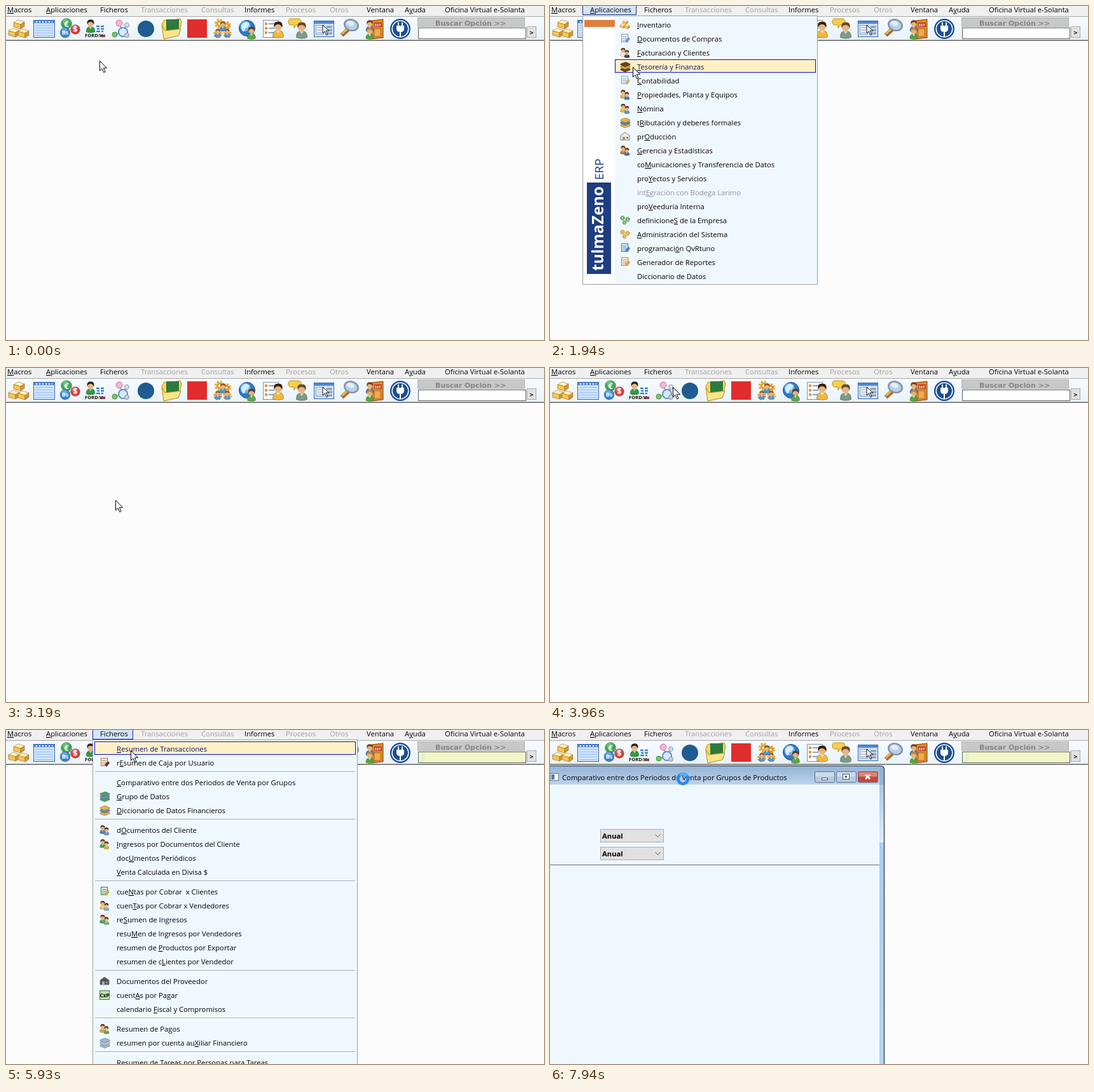
These frames come from a looping animation (846x526 px, 8 s). An HTML page:

```html
<!DOCTYPE html>
<html lang="es">
<head>
<meta charset="utf-8">
<style>
html, body { margin: 0; width: 100%; height: 100%; overflow: hidden; background: #fcfcfc; }
svg { display: block; width: 846px; height: 526px; }
text { font-family: "Open Sans", "Noto Sans", sans-serif; font-size: 11.25px; white-space: pre; }
.wide { font-family: "DejaVu Sans", Verdana, sans-serif; font-weight: bold; }
.u { text-decoration: underline; }
</style>
</head>
<body>
<svg id="stage" viewBox="0 0 846 526"></svg>
<script>
const LOOP = 8000;
const PANEL = '#f0f8ff', NAVY = '#1f3d80';

// Shape helpers
const rect = (x, y, w, h, fill, extra = '') => `<rect x="${x}" y="${y}" width="${w}" height="${h}" fill="${fill}" ${extra}/>`;
const frame = (x, y, w, h, fill, stroke) => rect(x + .5, y + .5, w - 1, h - 1, fill, `stroke="${stroke}"`);
const disc = (x, y, r, fill, extra = '') => `<circle cx="${x}" cy="${y}" r="${r}" fill="${fill}" ${extra}/>`;
const path = (d, fill, stroke = 'none', width = 1) => `<path d="${d}" fill="${fill}" stroke="${stroke}" stroke-width="${width}"/>`;
const line = (d, stroke, width = 1) => path(d, 'none', stroke, width);
const at = (x, y, scale, body) => `<g transform="translate(${x} ${y}) scale(${scale})">${body}</g>`;
// An underscore marks the underlined access key.
const text = (x, y, label, extra = '') =>
  `<text x="${x}" y="${y}" ${extra}>${label.replace(/_(.)/, '<tspan class="u">$1</tspan>')}</text>`;

// Icon parts, drawn around their own origin
const bar = (x, y) => at(x, y, 1,
  path('M0 4 7 0 17 3 11 7Z', '#fff3c4', '#b98a2c', .7) +
  path('M0 4 11 7V14L0 11Z', '#f5c55c', '#a87518', .7) +
  path('M11 7 17 3V10L11 14Z', '#d6982f', '#a87518', .7));
const person = (x, y, coat, hair = '#7a4a1c', scale = 1) => at(x, y, scale,
  path('M-8 14Q-9 4 0 4Q9 4 8 14Q0 17 -8 14Z', coat, '#00000066', .7) + path('M-3 4H3L0 9Z', '#fff9') +
  disc(0, -2, 6, '#e9b37c') + path('M-6 0Q-8 -9 0 -9Q8 -9 6 0Q4 -5 -1 -5Q-5 -4 -6 0Z', hair));
const gear = (x, y, r, fill) =>
  disc(x, y, r, 'none', `stroke="${fill}" stroke-width="${r * .7}" stroke-dasharray="${r * .45} ${r * .335}"`) +
  disc(x, y, r * .62, 'none', `stroke="${fill}" stroke-width="${r * .6}"`);
const globe = (x, y, r) => disc(x, y, r, '#3477c9', 'stroke="#1c4f94"') + disc(x - r * .2, y - r * .25, r * .65, '#6fb2ee') +
  path(`M${x - r * .7} ${y - r * .4}q${r * .5} ${-r * .7} ${r} ${-r * .2}q${-r * .1} ${r * .6} ${-r * .5} ${r * .6}q${-r * .2} ${r * .8} ${-r * .5} ${r * .1}Z`, '#d3eefa');
const panelWindow = (x, y, w, h) => frame(x, y, w, h, '#cfe3fb', '#3868b0') + rect(x + 1, y + 1, w - 2, 4, '#4f88dc');
const coin = (x, y, r, fill, sign, size) => disc(x, y, r, fill, 'stroke="#0003"') + disc(x - 1, y - r * .4, r * .55, '#fff4') +
  text(x, y + size * .36, sign, `fill="#fff" text-anchor="middle" style="font-size:${size}px;font-weight:bold"`);

const toolbarIcons = () => [
  bar(12, 22) + bar(4, 35) + bar(19, 36),
  panelWindow(43, 22, 34, 28) + `<path d="M47 25H73" stroke="#fff" stroke-width="2" stroke-dasharray="2 3"/>` +
    line('M46 30.5H74M46 34.5H74M46 38.5H74M46 42.5H74M46 46.5H74', '#9cc0f0'),
  coin(95, 28, 8.5, '#3fa653', '€', 13) + coin(93, 42, 8, '#3985d8', 'Bs', 9) + coin(109, 37, 7.5, '#d9423a', '$', 12),
  person(133, 29, '#2f9c3c', '#222', .85) + line('M142 32h5m2 0h5M143 36h4m2 0h5M142 40h6m2 0h3', '#3f82c8', 2.4) +
    text(124, 49, 'FORDAL', 'fill="#111" style="font-size:7.6px;font-weight:bold"') +
    rect(145, 45, 3, 4, '#e3b526') + rect(148, 45, 4, 4, '#2855a8') + rect(152, 45, 4, 4, '#cf2b2b'),
  line('M178 27 184 41 172 45M184 41 190 30', '#7b8ca0', 1.5) + disc(178, 27, 5, '#f5b4d6', 'stroke="#d06fa8"') +
    disc(190, 30, 3.5, '#d9dde4', 'stroke="#8992a0"') + disc(171, 45, 4, '#72c46a', 'stroke="#42923c"') +
    disc(184, 41, 7, '#d9eafc', 'stroke="#5b90cc" stroke-width="2"') + disc(190, 46, 3.5, '#c9ced8', 'stroke="#8992a0"'),
  disc(220, 36, 13, '#1f5c92'),
  path('M245 28 249 22 255 23 274 20 276 25 272 45 249 52Z', '#f6d861', '#b48d1e') + rect(252, 21, 20, 19, '#2c7a3c') +
    path('M245 31 250 39 275 36 271 47 248 52Z', '#f7e58a', '#b48d1e'),
  rect(285, 21, 31, 29, '#e02d2d'),
  gear(336, 28, 6, '#e6a934') + gear(347, 31, 5, '#d99b28') + gear(333, 44, 5, '#d99b28') + gear(348, 44, 5, '#e6a934') +
    person(341, 30, '#4f8ed8', '#8a5a20', .65) + person(333, 41, '#5a94d4', '#8a5a20', .55) + person(348, 41, '#5a94d4', '#8a5a20', .55),
  globe(379, 35, 12.5) + person(386, 40, '#58a843', '#5b3a18', .8),
  frame(404, 22, 25, 28, '#f8fbff', '#7a93b4') + line('M407 28h4M407 35h4M407 42h4', '#d99a3c', 4) +
    line('M413 28h9M413 35h9M413 42h9', '#86a5cc', 2) + person(428, 34, '#f0b83c', '#35220e', 1.05),
  path('M447 20h12q5 0 5 5t-5 5h-3l-3 5v-5h-5q-4 0-4-5t3-5Z', '#f5cf4a', '#be9420') + person(465, 35, '#7d9c86', '#6b4a25', 1.05),
  panelWindow(484, 23, 32, 26) + frame(487, 30, 13, 15, '#eef4fc', '#8a9cb8') + line('M489 34h8M489 38h8M489 42h8', '#8a9cb8') +
    line('M504 33h9M504 38h9M504 43h9', '#8a9cb8', 3) + path('M498 30V43L501 40 504 46 506 45 503 39H508Z', '#fff', '#111'),
  line('M538 37 528 46', '#a86b2a', 7) + line('M537 36 528 44', '#e8b56c', 3) +
    `<g transform="rotate(18 543 30)"><ellipse cx="543" cy="30" rx="11" ry="8.5" fill="#b9cfe8" stroke="#8191aa" stroke-width="2.5"/>
     <ellipse cx="541" cy="28" rx="6" ry="4" fill="#fff9"/></g>`,
  path('M575 23 593 21V50L575 52Z', '#dc8a2a', '#7d4310') + path('M579 36H589V48H579Z', '#efab4c', '#a8601a', .8) +
    rect(579, 26, 12, 7, '#c33b24') + text(580, 31.5, 'EXIT', 'fill="#fff" style="font-size:4.5px;font-weight:bold"') +
    person(572, 29, '#3b77c8', '#6d3e14', .75) + person(572, 41, '#55a33c', '#c8862a', .75),
  disc(620, 36, 16, '#1c4f94') + disc(620, 36, 12.8, 'none', 'stroke="#fff" stroke-width="1.6"') +
    path('M614 31H626V36Q626 41 620 41T614 36Z', '#fff') + line('M617 26V31M623 26V31M620 41V48', '#fff', 2),
].join('');

// Small menu icons, 16 units wide, centred on their origin
const mini = {
  bars: () => at(-8, -7, .5, bar(8, 0) + bar(0, 12) + bar(14, 14)),
  doc: (a, b) => frame(-6, -7, 11, 13, '#f4f7fb', a) + line('M-4 -3H3M-4 0H3M-4 3H1', a) + path('M0 3 6 -2 8 1 3 7Z', b),
  people: (a, b) => person(-3, -2, a, '#5c3b18', .55) + person(3, 1, b, '#3d2810', .5),
  stack: (a, b) => [4, 0, -4].map((y, i) => path(`M-7 ${y}L1 ${y - 3} 8 ${y}V${y + 2}L0 ${y + 5} -7 ${y + 2}Z`, i % 2 ? b : a, '#0006', .6)).join(''),
  gears: (a) => gear(-4, -3, 3, a) + gear(4, -1, 3, a) + gear(-1, 4, 2.7, a),
  house: (a, b) => path('M-7 -1 0 -6 7 -1V6H-7Z', a, '#777') + rect(-4, 1, 4, 5, b) + rect(2, 1, 3, 3, '#6d8aad'),
  tag: () => frame(-8, -7, 16, 15, '#bfe3b4', '#3c7a3c') +
    text(0, 4, 'CxP', 'text-anchor="middle" style="font-size:8px;font-weight:bold"'),
};
const glyph = (x, y, [kind, a, b]) => at(x, y, 1, mini[kind](a, b));

// Menu entries: label, then optional icon; null is a separator
const applications = [
  ['_Inventario', 'bars'], ['_Documentos de Compras', 'doc', '#8193ad', '#6b9bd8'],
  ['_Facturación y Clientes', 'people', '#e9e9d8', '#3c4656'], ['_Tesorería y Finanzas', 'stack', '#6b4116', '#d9a33a'],
  ['_Contabilidad', 'doc', '#7aa0c4', '#c9b66a'], ['_Propiedades, Planta y Equipos', 'people', '#e2b23c', '#3d7ac8'],
  ['_Nómina', 'people', '#e8b640', '#5f93cf'], ['t_Ributación y deberes formales', 'stack', '#e5b33b', '#5585bd'],
  ['pr_Oducción', 'house', '#eeeeea', '#d48c35'], ['_Gerencia y Estadísticas', 'people', '#c97a32', '#4e6fa6'],
  ['co_Municaciones y Transferencia de Datos'], ['pro_Yectos y Servicios'],
  ['int_Egración con Bodega Larimo'], ['pro_Veeduría Interna'],
  ['definicione_S de la Empresa', 'gears', '#62a85c'], ['_Administración del Sistema', 'gears', '#dba436'],
  ['programaci_ón QvRtuno', 'doc', '#2e68b8', '#3f83d6'], ['Generador de Reportes', 'doc', '#c57a2a', '#e09c44'],
  ['Diccionario de Datos'],
];
const files = [
  ['_Resumen de Transacciones'], ['r_Esumen de Caja por Usuario', 'doc', '#b0703a', '#5c3b22'], null,
  ['_Comparativo entre dos Periodos de Venta por Grupos'], ['_Grupo de Datos', 'stack', '#4d9e64', '#6f93b8'],
  ['_Diccionario de Datos Financieros', 'stack', '#e3b347', '#6a8fc4'], null,
  ['d_Ocumentos del Cliente', 'people', '#4f7fc0', '#7895b8'], ['_Ingresos por Documentos del Cliente', 'people', '#4f9f50', '#d6b140'],
  ['doc_Umentos Periódicos'], ['_Venta Calculada en Divisa $'], null,
  ['cue_Ntas por Cobrar  x Clientes', 'doc', '#2d6a3a', '#c9b23c'], ['cuen_Tas por Cobrar x Vendedores', 'people', '#eac566', '#7faad4'],
  ['re_Sumen de Ingresos', 'people', '#56a05a', '#7fae84'], ['resu_Men de Ingresos por Vendedores'],
  ['resumen de _Productos por Exportar'], ['resumen de c_Lientes por Vendedor'], null,
  ['Documentos del Proveedor', 'house', '#5c5148', '#8fb0d0'], ['cuent_As por Pagar', 'tag'],
  ['calendario _Fiscal y Compromisos'], null,
  ['Resumen de Pagos', 'people', '#d9a03a', '#62a456'], ['resumen por cuenta au_Xiliar Financiero', 'stack', '#9db4cf', '#b9c7d8'], null,
  ['_Resumen de Tareas por Personas para Tareas'],
];

function menu(id, entries, x, right, iconX, textX) {
  let y = 30, rows = '', rules = '';
  const centers = [];
  for (const entry of entries) {
    if (!entry) {
      rules += rect(140, y - 9, 409, 1, '#a5a9ae') + rect(140, y - 8, 409, 1, '#fff');
      y += 9;
      continue;
    }
    const [label, ...icon] = entry;
    rows += `<g class="row" fill="${label.startsWith('int_E') ? '#8e9299' : '#000'}">` +
      text(textX, y + 4, label) + (icon.length ? glyph(iconX, y - 1, icon) : '') + '</g>';
    centers.push(y);
    y += 22;
  }
  const highlight = `<rect class="mark" x="${x + .5}" width="${right - x - 1}" height="20" fill="#fff0c6" stroke="#0a0ae0"/>`;
  return { id, centers, markup: rules + highlight + rows };
}
const appMenu = menu('appMenu', applications, 102, 418, 118, 137);
const fileMenu = menu('fileMenu', files, 139, 550, 155, 174);

// x, label, disabled
const menuBar = [[2, '_Macros'], [63, '_Aplicaciones'], [148, 'Ficheros'], [212, 'Transacciones', 1], [307, 'Consultas', 1],
  [375, 'Informes'], [440, 'Procesos', 1], [509, 'Otros', 1], [567, 'Ventana'], [627, 'A_yuda'], [690, 'Oficina Virtual e-Solanta']];

const combo = y => frame(79, y, 100, 21, '#e1e1e1', '#adadad') +
  text(82, y + 15, 'Anual', 'style="font-weight:bold"') + line(`M165.5 ${y + 8.5}l4 4 4-4`, '#555');
const caption = (x, fill, mark) => rect(x + .5, 65.5, 31, 17, fill, 'rx="2" stroke="#5d7189"') +
  rect(x + 1.5, 66.5, 29, 7, '#fff5', 'rx="1"') + mark;

document.getElementById('stage').innerHTML = `
<defs>
  <linearGradient id="tool" x2="0" y2="1"><stop stop-color="#f7fbff"/><stop offset="1" stop-color="#e9f2fc"/></linearGradient>
  <linearGradient id="title" x2="0" y2="1"><stop stop-color="#94b3d4"/><stop offset="1" stop-color="#bcd4ec"/></linearGradient>
  <linearGradient id="edge" x2="0" y2="1"><stop stop-color="#a7c8e8"/><stop offset=".2" stop-color="#dcebf9"/>
    <stop offset=".207" stop-color="#e6f2fc"/><stop offset=".207" stop-color="#a9cfef"/><stop offset="1" stop-color="#b4d3ef"/></linearGradient>
</defs>
${rect(0, 0, 846, 526, '#fcfcfc')}
${rect(0, 0, 846, 16, '#f0f0f0')}
<g id="appHead">${frame(51, -1, 85, 15, '#d3e5f8', '#20306e')}</g>
<g id="fileHead">${frame(136, -1, 64, 16, '#d3e5f8', '#1818c8')}</g>
${menuBar.map(([x, label, off]) => text(x, 10, label, `fill="${off ? '#a0a0a0' : '#000'}"`)).join('')}
${rect(0, 16, 846, 38, 'url(#tool)')}${rect(0, 16, 846, 1, '#a8a8a8')}
${rect(0, 53, 846, 1, '#a0a0a0')}${rect(0, 54, 846, 1, '#696969')}
${toolbarIcons()}
${frame(647, 18, 169, 15, '#c8c8c8', '#b5b5b5')}
${text(675, 31, 'Buscar Opción &gt;&gt;', 'class="wide" fill="#858585" style="font-size:11px"')}
<rect id="search" x="648.5" y="34.5" width="169" height="17" stroke="#5f5f5f"/>
<g id="caret">${rect(653, 36, 6, 13, '#e2f1d2')}</g>
${frame(819, 32, 15, 18, '#e1e1e1', '#adadad')}${text(823, 45, '&gt;', 'class="wide" style="font-size:8px"')}
<g id="dialog">
  ${path('M0 56H520Q525 56 525 61V526H0Z', 'url(#title)')}
  ${rect(0, 57, 518, 29, 'url(#title)')}${rect(518, 86, 7, 440, 'url(#edge)')}
  ${line('M0 56.5H519Q525.5 56.5 525.5 62V526', '#25303c', 1.2)}
  ${rect(0, 86, 518, 440, PANEL)}${rect(0, 212, 518, 1, '#6b6b75')}
  ${frame(0, 68, 14, 12, '#fff', '#5f7896')}${rect(2, 70, 5, 8, '#4d7dab')}
  ${text(19, 79, 'Comparativo entre dos Periodos de Venta por Grupos de Productos')}
  ${caption(416, '#b3cae2', frame(427, 75, 10, 4, '#fff', '#4a5a6c'))}
  ${caption(450, '#b3cae2', frame(460, 69, 11, 9, '#fff', '#4a5a6c') + rect(464, 72, 3, 3, '#4a5a6c'))}
  ${caption(484, '#c8453a', line('M496 70.5 503 77M503 70.5 496 77', '#fff', 2.4))}
  <g id="combos">${combo(156)}${combo(184)}</g>
</g>
<g id="appMenu">
  ${frame(51, 15, 370, 424, PANEL, '#a0a0a0')}${rect(53, 17, 49, 420, '#fff')}${rect(54, 22, 48, 11, '#df7f3e')}
  <text transform="translate(84 274) rotate(-90)" fill="${NAVY}" style="font-size:19px">ERP</text>
  ${rect(58, 278, 38, 144, NAVY)}
  <text transform="translate(84 417) rotate(-90)" fill="#fff" style="font-size:24.5px;font-weight:bold">tulmaZeno</text>
  ${appMenu.markup}
</g>
<g id="fileMenu">${frame(136, 15, 417, 530, PANEL, '#a0a0a0')}${fileMenu.markup}</g>
<g id="arrow">${path('M.5 .5V16L4 12.7 6.7 18.7 9 17.7 6.4 11.7H11.5Z', '#fff', '#000')}</g>
<g id="spinner">
  ${disc(0, 0, 7.7, 'none', 'stroke="#2b8be6" stroke-width="5"')}
  <g id="sweep">${line('M0 -7.7A7.7 7.7 0 0 1 7.7 0', '#48b4f7', 5)}</g>
</g>`;

const el = id => document.getElementById(id);
const show = (id, on) => el(id).setAttribute('visibility', on ? 'inherit' : 'hidden');

// Pointer tip: time, x, y
const route = [[0, 147, 86], [30, 147, 86], [180, 105, 5], [350, 105, 5], [730, 112, 8], [1420, 112, 8], [1940, 130, 96],
  [2220, 146, 149], [2360, 164, 195], [2500, 166, 227], [2710, 172, 208], [3200, 172, 208], [3960, 193, 30], [4000, 193, 30],
  [4790, 189, 8], [5740, 189, 8], [6280, 209, 77], [LOOP, 209, 77]];

function pointer(t) {
  const i = route.findIndex(stop => stop[0] > t);
  const [t0, x0, y0] = route[i - 1], [t1, x1, y1] = route[i];
  const k = (t - t0) / (t1 - t0);
  return [Math.round(x0 + (x1 - x0) * k), Math.round(y0 + (y1 - y0) * k)];
}

function mark({ id, centers }, y) {
  const group = el(id), active = centers.findIndex(c => y >= c - 11 && y < c + 11);
  const box = group.querySelector('.mark');
  box.setAttribute('visibility', active < 0 ? 'hidden' : 'inherit');
  if (active >= 0) box.setAttribute('y', centers[active] - 11.5);
  group.querySelectorAll('.row').forEach((row, i) => row.style.fill = i === active ? '#10106a' : '');
}

function render(t) {
  const [x, y] = pointer(t), busy = t >= 6550;
  show('appHead', t >= 380 && t < 3190);
  show('appMenu', t >= 850 && t < 3190);
  show('fileHead', t >= 4450 && !busy);
  show('fileMenu', t >= 4920 && !busy);
  show('caret', t >= 4920);
  show('dialog', t >= 7040);
  show('combos', t >= 7590);
  show('arrow', !busy);
  show('spinner', busy);
  el('search').setAttribute('fill', t >= 4450 ? '#f2f7c8' : '#fff');
  mark(appMenu, y - 3);
  mark(fileMenu, y);
  el('arrow').setAttribute('transform', `translate(${x} ${y})`);
  el('spinner').setAttribute('transform', `translate(${x} ${y})`);
  el('sweep').setAttribute('transform', `rotate(${(t - 6550) * .36 + 180})`);
}

const start = performance.now();
function tick() {
  render((performance.now() - start) % LOOP);
  requestAnimationFrame(tick);
}
tick();
</script>
</body>
</html>
```
